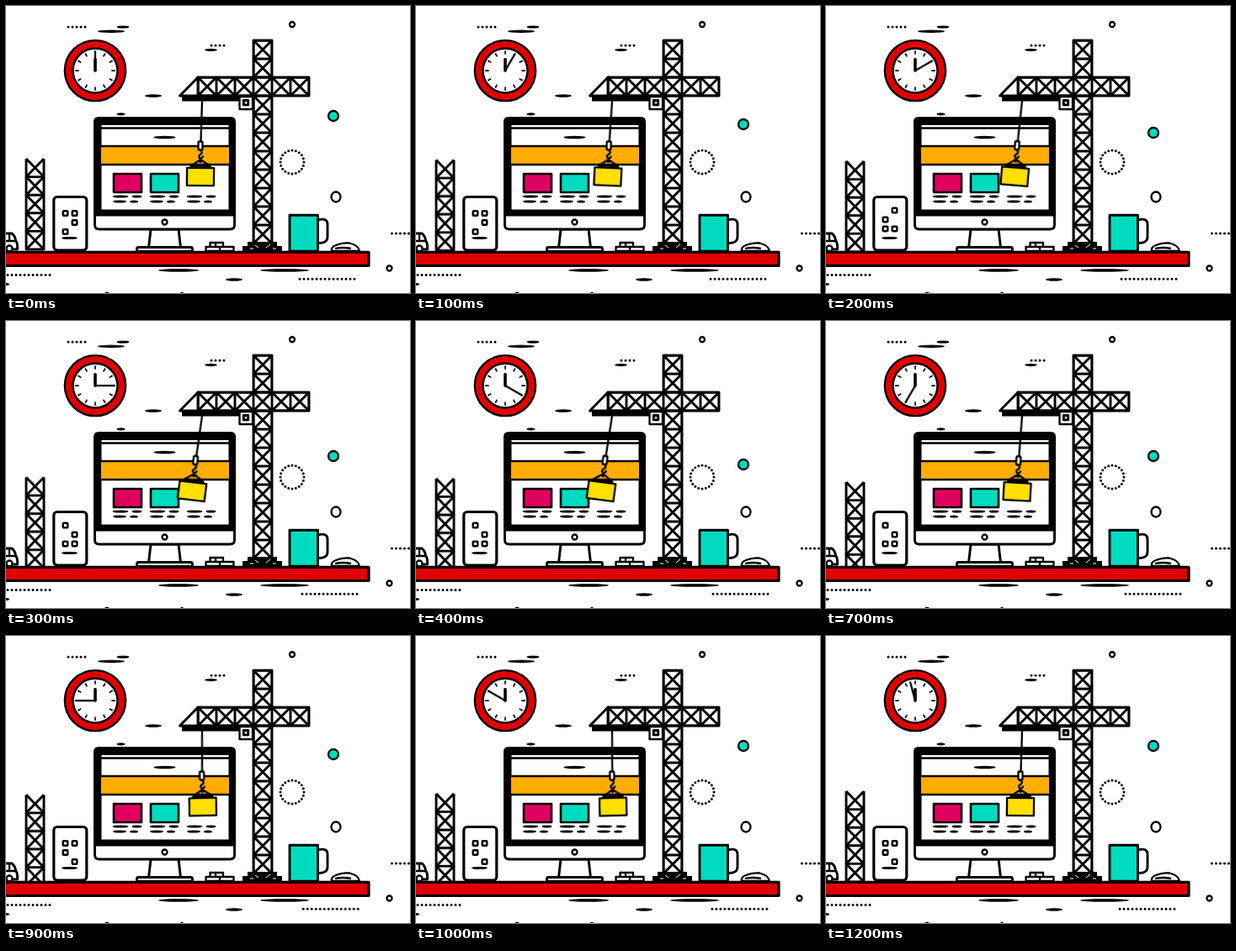
Recreate the animation shown at these times as an HTML page without scripts. Size 480x342 px, loop 1.3 s.

```html
<!DOCTYPE html>
<html lang="en">
<head>
<meta charset="utf-8">
<title>Site under construction</title>
<style>
html, body { margin: 0; width: 100%; height: 100%; overflow: hidden; background: #fff; }
svg { display: block; width: 480px; height: 342px; stroke: #000; stroke-width: 2.9; fill: none; stroke-linejoin: round; }
.white { fill: #fff; }
.black { fill: #000; }
.red { fill: #e00000; }
.teal { fill: #00dbc0; }
.dash { fill: #000; stroke: none; }
.dots { stroke-width: 3; stroke-linecap: round; stroke-dasharray: 0 5; }
.thin { stroke-width: 2.3; }

.minute, .load, .tower, .ball, .slide { animation: 1.3s infinite; }
.minute { transform-origin: 106px 77px; animation-name: tick; }
.load { transform-origin: 233px 113px; animation-name: swing; animation-timing-function: step-end; }
.tower { animation-name: sink; }
.ball { animation-name: bounce; }
.slide { animation-name: slide; }
.lit { visibility: hidden; animation: 1.3s step-end infinite; }
.l1 { animation-name: l1; }
.l2 { animation-name: l2; }
.l3 { animation-name: l3; }
.l4 { animation-name: l4; }

@keyframes tick {
  0% { transform: rotate(0deg); animation-timing-function: steps(11); }
  84.615% { transform: rotate(330deg); animation-timing-function: step-end; }
  92.307% { transform: rotate(345deg); animation-timing-function: step-end; }
  100% { transform: rotate(360deg); }
}
@keyframes swing {
  0%, 92.307%, 100% { transform: rotate(0deg); }
  7.692% { transform: rotate(2deg); }
  15.384% { transform: rotate(4.3deg); }
  23.076%, 38.461% { transform: rotate(6.3deg); }
  30.769% { transform: rotate(7deg); }
  46.153% { transform: rotate(4.6deg); }
  53.846% { transform: rotate(2.5deg); }
  61.538% { transform: rotate(.2deg); }
  69.230% { transform: rotate(-1.8deg); }
  76.923% { transform: rotate(-2deg); }
  84.615% { transform: rotate(-1deg); }
}
@keyframes sink {
  0% { transform: translateY(0); animation-timing-function: steps(7); }
  53.846% { transform: translateY(10px); animation-timing-function: steps(5); }
  92.307% { transform: translateY(3px); animation-timing-function: step-end; }
  100% { transform: translateY(0); }
}
@keyframes bounce {
  0% { transform: translateY(0); animation-timing-function: steps(5); }
  38.461% { transform: translateY(50px); animation-timing-function: steps(5); }
  76.923%, 100% { transform: translateY(0); }
}
@keyframes slide {
  0% { transform: translateX(0); animation-timing-function: steps(7); }
  53.846% { transform: translateX(7px); animation-timing-function: steps(5); }
  92.307%, 100% { transform: translateX(0); }
}
@keyframes l1 { 0% { visibility: visible; } 15.384%, 100% { visibility: hidden; } }
@keyframes l2 { 0%, 23.076%, 100% { visibility: hidden; } 15.384% { visibility: visible; } }
@keyframes l3 {
  0%, 38.461%, 69.230%, 100% { visibility: hidden; }
  23.076%, 53.846% { visibility: visible; }
}
@keyframes l4 {
  0%, 53.846% { visibility: hidden; }
  38.461%, 69.230%, 100% { visibility: visible; }
}
</style>
</head>
<body>
<svg viewBox="0 0 480 342">
  <defs>
    <pattern id="truss" x="294" y="41" width="22" height="22" patternUnits="userSpaceOnUse">
      <path class="white" d="M0 0H22V22H0ZL22 22M22 0L0 22"/>
    </pattern>
    <path id="brace" d="M24 0V21.6H45V0M24 0L45 21.6M45 0L24 21.6"/>
    <rect id="sq" x="-2.8" y="-2.8" width="5.6" height="5.6" rx=".8" class="white" stroke-width="2.4"/>
    <g id="words" class="dash">
      <ellipse cx="9" cy="227" rx="9.5" ry="1.6"/>
      <ellipse cx="28.5" cy="227" rx="6" ry="1.6"/>
      <ellipse cx="8" cy="233" rx="8" ry="1.6"/>
      <ellipse cx="25" cy="233" rx="5" ry="1.6"/>
    </g>
  </defs>

  <!-- floating marks -->
  <g class="dash">
    <ellipse cx="125" cy="30.3" rx="16" ry="1.7"/>
    <ellipse cx="139" cy="25" rx="7.5" ry="1.6"/>
    <ellipse cx="175" cy="107" rx="10" ry="1.7"/>
    <ellipse cx="243.5" cy="52.3" rx="7.5" ry="1.6"/>
    <ellipse cx="136.5" cy="128.8" rx="5" ry="1.6"/>
    <ellipse cx="205" cy="315" rx="24" ry="1.8"/>
    <ellipse cx="331" cy="315" rx="29" ry="1.8"/>
    <ellipse cx="271" cy="326" rx="10" ry="1.8"/>
    <ellipse cx="-1" cy="331.5" rx="5" ry="1.6"/>
    <circle cx="209" cy="342.5" r="1.8"/>
  </g>
  <path class="dots" d="M74 25H95M244 47H261M2 320.5H53M458.5 271H480"/>
  <path class="dots slide" d="M349 325.3H415"/>
  <circle class="dots" cx="340" cy="186" r="14" pathLength="100"/>
  <g class="thin">
    <circle cx="340" cy="22" r="3"/>
    <circle cx="455.5" cy="312.5" r="3"/>
    <ellipse cx="392" cy="227.5" rx="5.5" ry="6"/>
    <circle cx="120" cy="345" r="3"/>
    <circle class="teal ball" cx="389" cy="131" r="6"/>
  </g>

  <!-- clock -->
  <circle class="red" cx="106" cy="77" r="36.2" stroke-width="2.3"/>
  <circle class="white" cx="106" cy="77" r="26.5" stroke-width="2.5"/>
  <circle cx="106" cy="77" r="21.5" stroke-width="4.5" pathLength="120" stroke-dasharray="1.5 8.5" stroke-dashoffset=".75"/>
  <path d="M106 77V63.5" stroke-width="3.6" stroke-linecap="round"/>
  <path class="minute" d="M106 77V53.5" stroke-width="2.3"/>

  <!-- small tower, its foot hidden by the table -->
  <g class="tower">
    <path class="white" stroke="none" d="M24 182L34.5 193L45 182V304H24Z"/>
    <use href="#brace" y="182"/>
    <use href="#brace" y="203.6"/>
    <use href="#brace" y="225.2"/>
    <use href="#brace" y="246.8"/>
    <use href="#brace" y="268.4"/>
  </g>

  <!-- van -->
  <path class="white" d="M-3 271H7Q11 274 11.5 280Q14 282 13.5 290H-3"/>
  <path class="thin" d="M0 280H11M4 272V280"/>
  <circle class="white thin" cx="4" cy="289" r="3.5"/>

  <!-- panel with lights -->
  <rect class="white" x="56.8" y="227.5" width="39" height="63.5" rx="4" stroke-width="3.2"/>
  <ellipse class="dash" cx="75.5" cy="276.5" rx="9.5" ry="1.6"/>
  <g class="lit l1">
    <use href="#sq" x="70.5" y="247"/><use href="#sq" x="81.5" y="247"/>
    <use href="#sq" x="81.5" y="258"/><use href="#sq" x="70.5" y="269"/>
  </g>
  <g class="lit l2">
    <use href="#sq" x="81.5" y="243.5"/><use href="#sq" x="70.5" y="254.5"/>
    <use href="#sq" x="70.5" y="265.5"/><use href="#sq" x="81.5" y="265.5"/>
  </g>
  <g class="lit l3">
    <use href="#sq" x="70.5" y="243.5"/><use href="#sq" x="81.5" y="254.5"/>
    <use href="#sq" x="70.5" y="265.5"/><use href="#sq" x="81.5" y="265.5"/>
  </g>
  <g class="lit l4">
    <use href="#sq" x="70.5" y="247"/><use href="#sq" x="81.5" y="247"/>
    <use href="#sq" x="70.5" y="258"/><use href="#sq" x="81.5" y="269"/>
  </g>

  <!-- monitor -->
  <path class="white" d="M172 266L169.500 288H207.500L205 266Z"/>
  <rect class="white" x="155.5" y="287.5" width="66" height="5" rx="2"/>
  <path class="white" d="M105.500 246H271.500V261Q271.500 266 266 266H111Q105.500 266 105.500 261Z"/>
  <path class="black" stroke="none" d="M110 132H267Q273 132 273 138V250.500H104V138Q104 132 110 132Z"/>
  <rect class="white" x="113.5" y="142" width="151" height="100.500" stroke="none"/>
  <path d="M113 145.500H265" stroke-width="2.400"/>
  <ellipse class="dash" cx="188.500" cy="156.500" rx="13" ry="1.700"/>
  <rect x="113" y="167" width="152" height="22" fill="#ffae00" stroke="none"/>
  <path d="M113 167H265M113 189H265" stroke-width="2.600"/>
  <rect x="128" y="200" width="33" height="22" fill="#e0005f" stroke-width="2.600"/>
  <rect class="teal" x="172" y="200" width="33" height="22" stroke-width="2.600"/>
  <use href="#words" x="127"/>
  <use href="#words" x="171"/>
  <use href="#words" x="215"/>
  <circle class="white thin" cx="188.500" cy="257.500" r="3"/>

  <!-- bricks -->
  <path class="white thin" d="M237.500 287H254V292H237.500ZM254 287H270.500V292H254ZM242.500 282H258V287H242.500ZM249 282V287"/>

  <!-- crane -->
  <rect x="294" y="41" width="22" height="242" fill="url(#truss)"/>
  <rect x="228" y="85" width="132" height="22" fill="url(#truss)"/>
  <path class="white" d="M228 85L206.500 107H228Z"/>
  <rect class="black" x="209" y="107" width="69" height="6.500" stroke="none"/>
  <rect class="white thin" x="277.500" y="108" width="15.500" height="15"/>
  <rect class="white" x="282.300" y="112.500" width="5.400" height="5.400"/>
  <path class="black" stroke="none" d="M287 281H322V286H328V293H281V286H287Z"/>
  <path d="M296 285L300 288M309 288L314 284M290 289H294M317 289H321" stroke="#fff" stroke-width="1"/>

  <!-- hanging load -->
  <g class="load thin">
    <path d="M233 113L231.500 161"/>
    <rect class="white" x="228.500" y="161.500" width="5" height="10" rx="1"/>
    <path d="M231 172Q234.500 174 231.500 176.500Q227.500 179 230 181Q233.500 182.500 234 178.500"/>
    <path d="M231 183L219.500 191H243L231 183V187"/>
    <rect x="215" y="193" width="32" height="21" fill="#ffe000" transform="rotate(.8 231 203)"/>
  </g>

  <!-- mug and mouse -->
  <path class="white" d="M370.500 255Q382 252 382 260V275Q382 283 370.500 282.500"/>
  <rect class="teal" x="337" y="249.300" width="33.500" height="43"/>
  <path class="white thin" d="M387 292Q386 287 392 285Q400 281.500 408 282.500Q419 285 420 292Z"/>
  <path class="thin" d="M391 289Q400 287 410 289"/>

  <!-- table -->
  <rect class="red" x="-4" y="293.300" width="435" height="16.200" stroke-width="3.200"/>
</svg>
</body>
</html>
```
